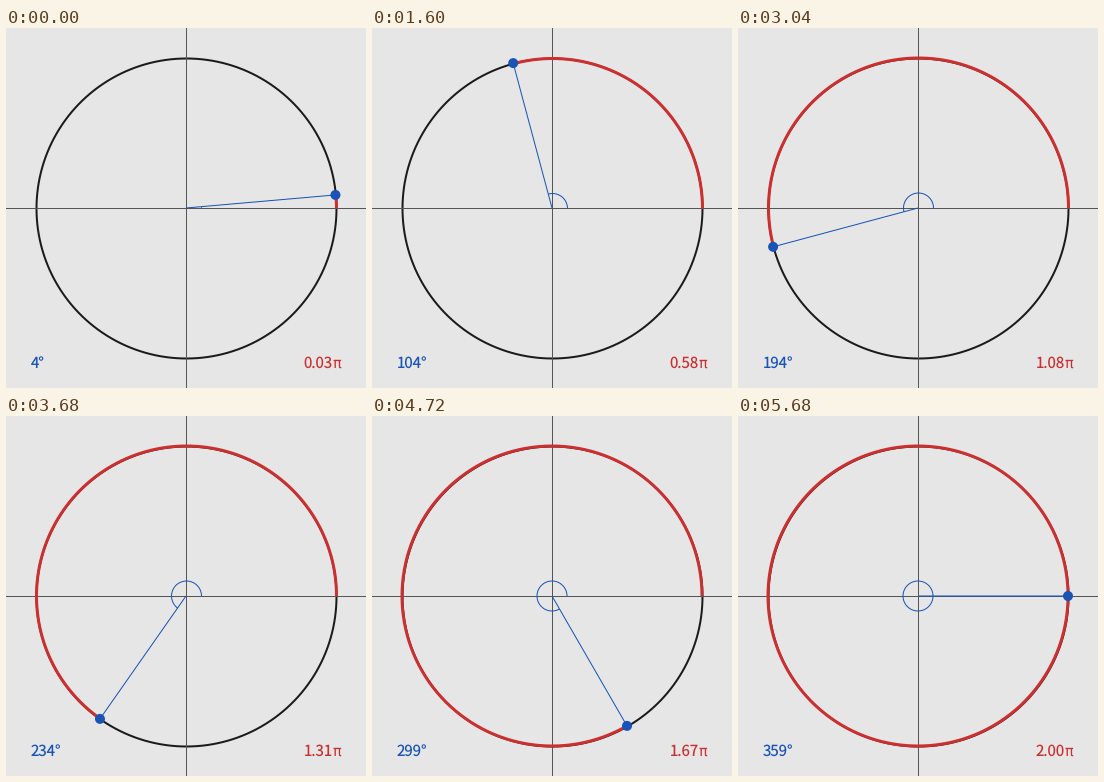
A matplotlib script that plays this animation: 360 by 360 pixels, repeating every 5.76 s.

```python
import numpy as np
import matplotlib.pyplot as plt
from matplotlib.animation import FuncAnimation

SIZE, RADIUS, MARK_RADIUS = 360, 150, 15
STEPS, INTERVAL = 72, 80
BG, INK, AXIS = "#e6e6e6", "#1a1a1a", "#555555"
RED, BLUE = "#cb2f2f", "#1853b5"

plt.rcParams["text.hinting"] = "none"

# At 72 dpi one point equals one pixel.
fig = plt.figure(figsize=(SIZE / 72, SIZE / 72), dpi=72, facecolor=BG)
ax = fig.add_axes([0, 0, 1, 1])
ax.set_xlim(0, SIZE)
ax.set_ylim(SIZE, 0)
ax.axis("off")


def arc(radius, degrees, cx, cy):
    t = np.radians(np.linspace(0, degrees, 361))
    return cx + radius * np.cos(t), cy - radius * np.sin(t)


def stroke(color, width, z, x=(), y=()):
    line, = ax.plot(x, y, color=color, lw=width, zorder=z,
                    solid_capstyle="butt", snap=False)
    return line


def label(x, color, text="", **style):
    return ax.text(x, 340, text, color=color, va="baseline", **style)


stroke(INK, 2, 1, *arc(RADIUS, 360, 180.5, 180.5))
stroke(AXIS, 1, 2, (0, SIZE), (180.5, 180.5))
stroke(AXIS, 1, 2, (180.5, 180.5), (0, SIZE))

swept = stroke(RED, 3, 3)
mark = stroke(BLUE, 1, 4)
arm = stroke(BLUE, 1, 4)
dot = plt.Circle((330, 180), 5, fc=BLUE, ec="none", zorder=5)
ax.add_patch(dot)

digits = dict(family="Noto Sans CJK JP", size=15)
degree_text = label(24.5, BLUE, **digits)
radian_text = label(297.5, RED, **digits)
label(335.3, RED, "π", family="DejaVu Sans", size=14.5, ha="right")


def update(i):
    angle = 5 * (i + 1)
    t = np.radians(angle)
    x, y = 180 + RADIUS * np.cos(t), 180 - RADIUS * np.sin(t)

    # The arcs settle by half a pixel as they wrap around.
    cx = 180.5 if angle <= 270 else 180
    cy = 180.5 if angle <= 180 else 180
    swept.set_data(*arc(RADIUS, angle, cx, cy))
    mark.set_data(*arc(MARK_RADIUS, angle, cx, cy))
    arm.set_data((180, x), (180, y))
    dot.center = x, y

    degree_text.set_text(f"{angle - 1}°")
    radian_text.set_text(f"{angle / 180:.2f}")
    return swept, mark, arm, dot, degree_text, radian_text


anim = FuncAnimation(fig, update, frames=STEPS, interval=INTERVAL,
                     repeat=True, repeat_delay=0)
plt.show()
```
